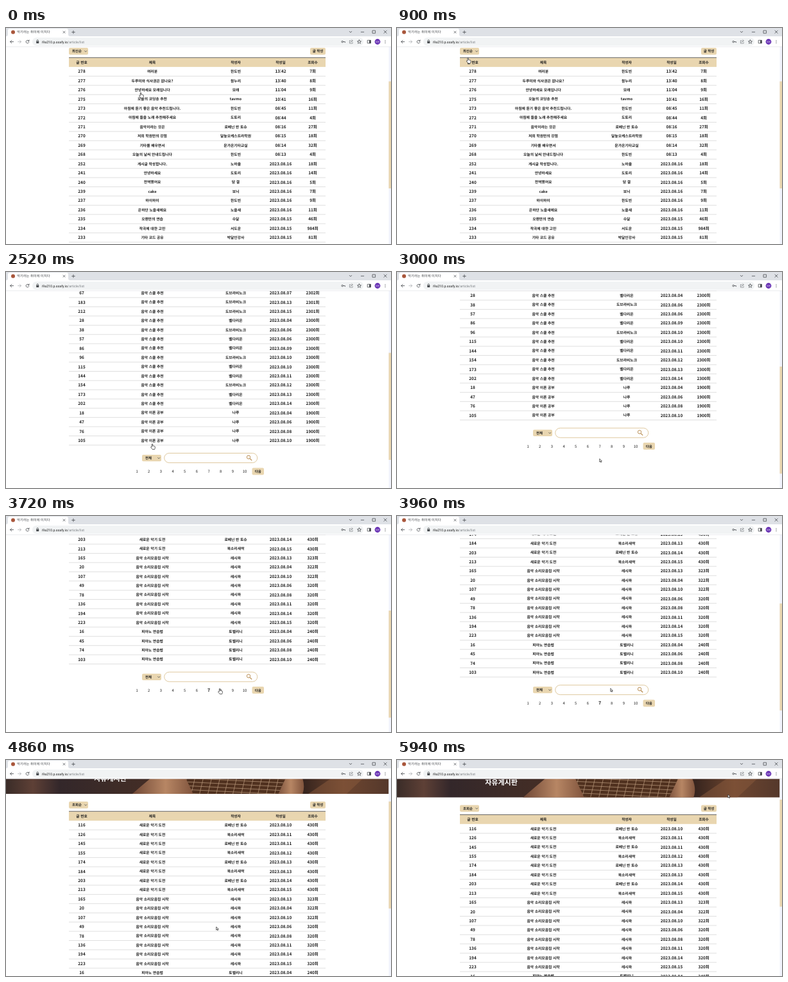
An HTML page for the animation above (6000 ms loop, 600x338 px).

```html
<!DOCTYPE html>
<html lang="ko">
<head>
<meta charset="utf-8">
<title>게시판</title>
<style>
  html, body { margin: 0; width: 100%; height: 100%; overflow: hidden; background: #fff; }
  svg { display: block; width: 600px; height: 338px; }
  text {
    font-family: 'Noto Sans CJK KR', 'Noto Sans CJK', 'Noto Sans', sans-serif;
    font-weight: 500; fill: #1c1c1c; text-rendering: geometricPrecision;
  }
  .mid { text-anchor: middle; }
  .bold { font-weight: 700; }
  .url { font-family: Roboto, sans-serif; font-weight: 400; font-size: 5.3px; }
  .line { fill: none; stroke: #4a4d51; stroke-width: .8; stroke-linecap: round; stroke-linejoin: round; }
  .tan { fill: #e9d6b0; }
</style>
</head>
<body>
<svg viewBox="0 0 600 338">
  <defs>
    <linearGradient id="photo">
      <stop offset="0" stop-color="#3a2c28"/>
      <stop offset=".07" stop-color="#5e4036"/>
      <stop offset=".14" stop-color="#33272a"/>
      <stop offset=".3" stop-color="#3f2c27"/>
      <stop offset=".5" stop-color="#4a2f24"/>
      <stop offset=".78" stop-color="#38251e"/>
      <stop offset=".88" stop-color="#6e4630"/>
      <stop offset="1" stop-color="#54382b"/>
    </linearGradient>
    <linearGradient id="skin">
      <stop offset="0" stop-color="#6f4735"/>
      <stop offset=".55" stop-color="#b78664"/>
      <stop offset="1" stop-color="#80543d"/>
    </linearGradient>
    <clipPath id="bannerBox"><path d="M0-124H596.5V-34.6H0z"/></clipPath>
    <clipPath id="neck"><path d="M276-68H440L424-34H292z"/></clipPath>
  </defs>
  <rect width="600" height="338" fill="#fff"/>

  <g id="page">
    <g clip-path="url(#bannerBox)">
      <rect y="-124" width="597" height="90" fill="url(#photo)"/>
      <path d="M196-34Q214-50 236-68H278L292-34z" fill="url(#skin)"/>
      <path d="M424-34Q414-48 424-68H458Q468-50 462-34z" fill="url(#skin)"/>
      <path d="M470-34L520-68H566L530-34z" fill="#8a5a3d" opacity=".5"/>
      <g clip-path="url(#neck)">
        <path d="M270-70H450V-34H270z" fill="#50311f"/>
        <g id="strings" stroke="#d3b393" stroke-width=".8" opacity=".75"></g>
      </g>
      <text class="mid bold" x="162.5" y="-54.5" font-size="11" style="fill:#fff">자유게시판</text>
    </g>
    <rect class="tan" x="98" y="-22.6" width="30" height="10.6" rx="2"/>
    <text id="sort" class="bold" x="103" y="-15.3" font-size="5.4"></text>
    <path class="line" d="M122.6-18l1.6 1.6 1.6-1.6"/>
    <rect class="tan" x="474" y="-22.6" width="24" height="10.6" rx="2"/>
    <text class="mid bold" x="486" y="-15.3" font-size="5.5">글 작성</text>
    <rect class="tan" x="98" y="-7.2" width="400" height="14.4"/>
    <path d="M98-7.4H498" stroke="#555" stroke-width=".9"/>
    <g id="head"></g>
    <g id="lines" stroke="#d2d2d2" stroke-width=".7"></g>
    <g id="lists"></g>

    <rect class="tan" x="212" y="310.9" width="30" height="10.2" rx="2"/>
    <text class="bold" x="217" y="318" font-size="5.4">전체</text>
    <path class="line" d="M236.6 315.4l1.6 1.6 1.6-1.6"/>
    <rect x="246.7" y="308.4" width="145" height="15" rx="7.5" fill="#fff" stroke="#dfc99f"/>
    <g fill="none" stroke="#b98d52"><circle cx="378" cy="314.6" r="2.7"/><path d="M380.1 316.8l3 3" stroke-width="1.3"/></g>
    <g id="pager"></g>
    <rect class="tan" x="383.5" y="331.3" width="18.5" height="11" rx="2"/>
    <text class="mid bold" x="392.8" y="338.8" font-size="5.4">다음</text>
  </g>

  <rect x="596.5" y="29" width="3.5" height="309" fill="#f1f3fc"/>
  <rect id="thumb" x="596.5" width="3.5" height="167.5" fill="#e9d6b0"/>

  <g id="browser">
    <rect width="600" height="13" fill="#dee1e6"/>
    <path d="M0 13Q3 13 3 10V4Q3 1 6 1H94Q97 1 97 4V10Q97 13 100 13z" fill="#fff"/>
    <circle cx="11" cy="6.5" r="3" fill="#a9573c"/>
    <text x="17" y="8.4" font-size="5.3" style="fill:#45484c;font-weight:400">악기라는 취미에 미치다</text>
    <path class="line" d="M89 5l3 3m0-3l-3 3M102.7 6.5h4.6m-2.3-2.3v4.6M535.2 5.3l1.8 1.8 1.8-1.8M553.3 6.3h4.4M571.4 4h4.2v4.2h-4.2zM589 4l4.2 4.2m0-4.2L589 8.2"/>
    <rect y="13" width="600" height="16.4" fill="#fff"/>
    <path d="M0 29.3H600" stroke="#dcdee1" stroke-width=".6"/>
    <rect x="41" y="15" width="516" height="12.8" rx="6.4" fill="#f1f3f4"/>
    <path class="line" d="M11.6 21.5H6.6m2.3-2.3l-2.3 2.3 2.3 2.3M35.5 20.1a2.4 2.4 0 1 0 .3 2.3M36 18.7v1.9h-1.9"/>
    <path class="line" d="M18.6 21.5h5m-2.3-2.3l2.3 2.3-2.3 2.3" style="stroke:#b0b3b7"/>
    <path class="line" d="M48 21v-1.2a1.2 1.2 0 0 1 2.4 0V21"/>
    <rect x="47.2" y="20.8" width="4" height="3.2" rx=".5" fill="#4a4d51"/>
    <text class="url" x="56" y="23.5">i9a210.p.ssafy.io<tspan fill="#7b7f84">/article/list</tspan></text>
    <circle class="line" cx="524.2" cy="21.5" r="1.3"/>
    <path class="line" d="M525.6 21.5h2.8v1.2M550.5 18.6l.9 1.9 2.1.2-1.6 1.4.5 2.1-1.9-1.1-1.9 1.1.5-2.1-1.6-1.4 2.1-.2zM563.6 19.2h4.8v4.6h-4.8z"/>
    <path class="line" d="M537 19.6h-1.6v4.4h4.8v-1.4M537 22.2q.3-2.3 3-2.3m-1.2-1.4l1.6 1.4-1.6 1.4" style="stroke:#85888c"/>
    <path d="M566 19h2.6v5H566z" fill="#4a4d51"/>
    <circle cx="579" cy="21.5" r="4.4" fill="#6a35b5"/>
    <text class="mid" x="579" y="22.8" font-size="3.4" style="fill:#fff">도빈</text>
    <path d="M591 19.5v.1m0 1.9v.1m0 1.9v.1" stroke="#4a4d51" stroke-width="1.1" stroke-linecap="round"/>
  </g>

  <g id="cursor" stroke="#222" stroke-width=".7" stroke-linejoin="round" fill="#fff">
    <path id="arrow" d="M0 0V5L1.2 3.9 2 5.7 2.8 5.3 2 3.6H3.5z"/>
    <path id="hand" d="M-.7 4.8V.8Q-.7 0 0 0T.7.8V3.2Q1.5 2.6 2 3.5 2.8 3 3.2 3.8 4.2 3.4 4.3 4.6V6.2Q4.2 7.4 3.6 8.6H.2Q-.6 7.3-2.2 5.6-2.5 4.4-1.6 4.5z"/>
  </g>
</svg>

<script>
const LOOP = 6000, STEP = 60, PITCH = 14.43;
const SORTED_AT = 1020, PAGED_AT = 3300;
const COLS = [118, 228, 358, 428, 478];
const $ = id => document.getElementById(id);

function add(parent, tag, attrs, text = '') {
  const node = document.createElementNS('http://www.w3.org/2000/svg', tag);
  for (const k in attrs) node.setAttribute(k, attrs[k]);
  node.textContent = text;
  return parent.appendChild(node);
}

function label(parent, x, y, size, text, cls = 'mid bold') {
  return add(parent, 'text', { x, y: y + size * .36, 'font-size': size, class: cls }, text);
}

const latest = `278|여러분|한도빈|13:42|7
277|두루미와 식사권은 없나요?|참누리|13:40|8
276|안녕하세요 모래입니다|모래|11:04|9
275|오늘의 코딩송 추천|tavmo|10:41|16
273|아침에 듣기 좋은 음악 추천드립니다.|한도빈|08:45|11
272|아침에 들을 노래 추천해주세요|도토리|08:44|4
271|음악이라는 것은|로베닌 반 토슈|08:16|27
270|저희 학원만의 강점|달늪오케스트라학원|08:15|18
269|기타를 배우면서|문가온기타교실|08:14|32
268|오늘의 날씨 안내드립니다|한도빈|08:13|4
252|게시글 작성합니다.|노하율|16|18
241|안녕하세요|도토리|16|14
240|전역했어요|담 결|16|5
239|cake|보늬|16|7
237|하이하이|한도빈|16|9
236|은하단 노을새에요|노을새|16|11
235|오랜만의 연습|수달|15|46
234|작곡에 대한 고민|서도운|15|984
233|기타 코드 공유|박달인강사|15|81`.split('\n').map(row => {
  const cells = row.split('|');
  if (cells[3].length === 2) cells[3] = '2023.08.' + cells[3];
  return cells;
});

// Posts repeat every 29 ids: title, author, base views
const KINDS = {
  9: ['음악 스쿨 추천', '도브라비노크', 2300],
  28: ['음악 스쿨 추천', '벨다리온', 2300],
  18: ['음악 이론 공부', '나루', 1900],
  0: ['새로운 악기 도전', '로베닌 반 토슈', 430],
  10: ['새로운 악기 도전', '북소리새싹', 430],
  20: ['음악 소리모음집 시작', '레시파', 320],
  16: ['피아노 연습법', '토벨리니', 240]
};
const EXTRA = { 9: 3, 125: 3, 231: 3, 67: 2, 183: 1, 212: 1, 165: 3, 20: 2, 107: 2 };
const DAY_STARTS = [0, 30, 60, 70, 80, 90, 120, 150, 160, 190, 210];

function post(id) {
  const [title, author, views] = KINDS[id % 29];
  const n = DAY_STARTS.filter(start => id >= start).length;
  const day = n === 1 ? 4 : n + 4;
  return [id, title, author, '2023.08.' + String(day).padStart(2, '0'), views + (EXTRA[id] || 0)];
}

const popular = [9, 125, 231, 67, 183, 212, 28, 38, 57, 86, 96, 115, 144, 154, 173, 202, 18, 47, 76, 105].map(post);
const seventh = [116, 126, 145, 155, 174, 184, 203, 213, 165, 20, 107, 49, 78, 136, 194, 223, 16, 45, 74, 103].map(post);

function table(rows) {
  const group = add($('lists'), 'g', {});
  rows.forEach((cells, i) => cells.forEach((cell, c) => {
    const size = c === 1 || c === 2 ? 5.8 : 6.4;
    label(group, COLS[c], PITCH * (i + 1), size, c === 4 ? cell + '회' : cell);
  }));
  return group;
}

const tables = [latest, popular, seventh].map(table);
['글 번호', '제목', '작성자', '작성일', '조회수'].forEach((name, c) => label($('head'), COLS[c], 0, 5.7, name));
for (let i = 1; i <= 20; i++) {
  const y = 7.2 + PITCH * i;
  add($('lines'), 'path', { d: `M98 ${y}H498` });
}
for (let i = 0; i < 7; i++) add($('strings'), 'path', { d: `M270 ${-72 + i * 6}l180 9` });
for (let i = 0; i < 13; i++) add($('strings'), 'path', { d: `M${284 + i * 13} -70l-9 38` });
const pages = Array.from({ length: 10 }, (_, i) => label($('pager'), 204 + i * 18.67, 336.8, 5.8, i + 1, 'mid'));

// Wheel notches: start time and direction
const NOTCH = 39.3, NOTCH_MS = 234;
const wheel = [[1500, -1], [2100, -1], [2760, -1], [3840, 1], [4050, 1], [4260, 1], [4680, 1]];
const path = [
  [0, 210, 101], [420, 116, 36], [660, 116, 36], [960, 110, 48], [1080, 112, 48],
  [1500, 236, 75], [1680, 236, 75], [2400, 228, 269], [2580, 228, 269], [2940, 316, 300],
  [3120, 315, 270], [3420, 315, 270], [3660, 333, 270], [3900, 333, 270], [4320, 328.5, 264.5],
  [4560, 328.5, 264.5], [4800, 327.7, 261], [5040, 327.7, 261], [5880, 515.7, 54], [LOOP, 515.7, 54]
];

function ease(p) {
  p = Math.min(1, Math.max(0, p));
  return p * p * (3 - 2 * p);
}

function pointer(t) {
  const i = path.findIndex(key => key[0] > t);
  const [t0, x0, y0] = path[i - 1], [t1, x1, y1] = path[i];
  const p = ease((t - t0) / (t1 - t0));
  return [x0 + (x1 - x0) * p, y0 + (y1 - y0) * p];
}

function show(node, on) {
  node.setAttribute('display', on ? 'inline' : 'none');
}

function draw(t) {
  const top = wheel.reduce((y, [start, dir]) => y + dir * NOTCH * ease((t - start) / NOTCH_MS), 53.7);
  $('page').setAttribute('transform', `translate(0 ${top.toFixed(2)})`);
  $('thumb').setAttribute('y', 148 - (top + 64.2) * .547);

  const current = t < SORTED_AT ? 0 : t < PAGED_AT ? 1 : 2;
  tables.forEach((g, i) => show(g, i === current));
  $('sort').textContent = current ? '조회순' : '최신순';
  pages[6].setAttribute('class', current === 2 ? 'mid bold' : 'mid');
  pages[6].setAttribute('font-size', current === 2 ? 7 : 5.8);

  const hand = t < 2580 || (t >= 3060 && t < 3840);
  show($('hand'), hand);
  show($('arrow'), !hand);
  $('cursor').setAttribute('transform', `translate(${pointer(t)})`);
}

const begin = performance.now();
function tick() {
  const t = (performance.now() - begin) % LOOP;
  draw(Math.floor(t / STEP) * STEP);
  requestAnimationFrame(tick);
}
tick();
</script>
</body>
</html>
```
